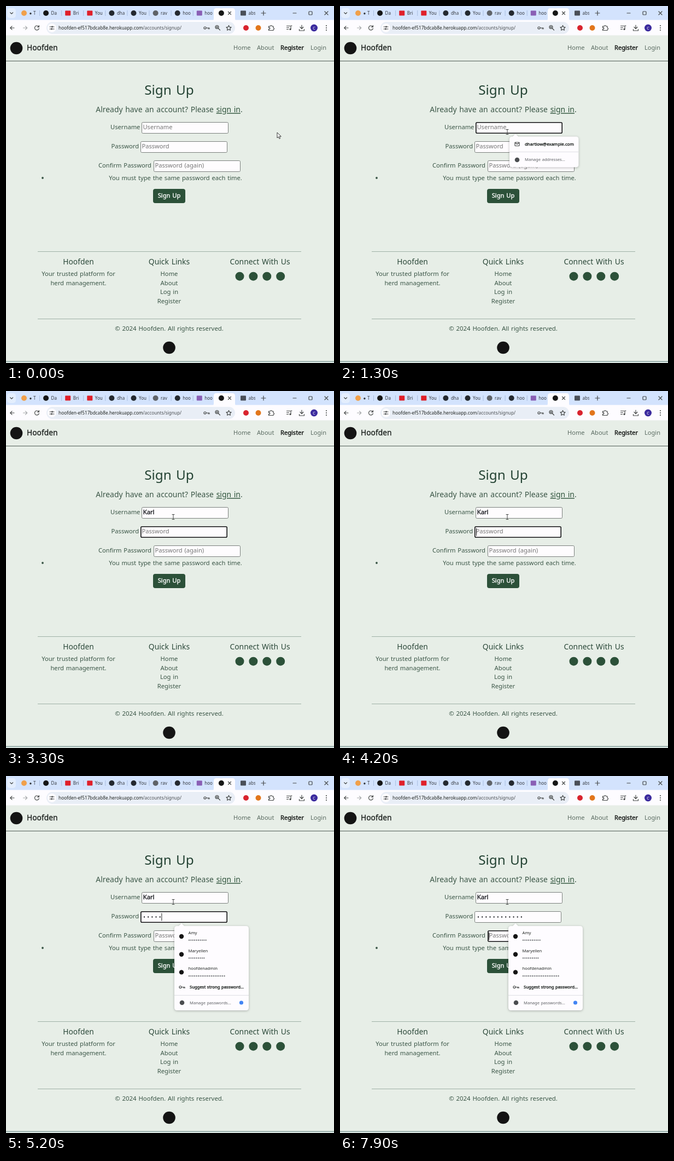
An HTML page for the animation above (8000 ms loop, 600 by 652 pixels).

```html
<!DOCTYPE html>
<html lang="en">
<head>
<meta charset="utf-8">
<title>Sign Up</title>
<style>
html, body { margin: 0; width: 100%; height: 100%; overflow: hidden; background: #e7eee7; }
svg { display: block; width: 600px; height: 652px; }
text { font-family: "Noto Sans", "Open Sans", sans-serif; word-spacing: .08em; white-space: pre; }
.line { fill: none; stroke: #444746; stroke-width: 1.2; stroke-linecap: round; stroke-linejoin: round; }
.pop { fill: #fefcff; filter: drop-shadow(0 1px 2px #0004); }
</style>
</head>
<body>
<svg id="stage" viewBox="0 0 600 652" xmlns="http://www.w3.org/2000/svg"></svg>
<script>
const GREEN = '#2c5139', INK = '#3a5546', HEAD = '#2b4839', DARK = '#1f2421', GRAY = '#757575';
const text = (x, y, s, size = 11.2, fill = INK, more = '') =>
  `<text x="${x}" y="${y}" font-size="${size}" fill="${fill}" ${more}>${s}</text>`;
const mid = (x, y, s, size, fill, more = '') =>
  text(x, y, s, size, fill, `text-anchor="middle" ${more}`);
// A thin outline gives a medium weight without changing the widths.
const medium = color => `stroke="${color}" stroke-width=".35"`;
const dot = (x, y, r, fill) => `<circle cx="${x}" cy="${y}" r="${r}" fill="${fill}"/>`;
const box = (x, y, w, h, fill, more = '') =>
  `<rect x="${x}" y="${y}" width="${w}" height="${h}" fill="${fill}" ${more}/>`;
const line = (d, more = '') => `<path class="line" d="${d}" ${more}/>`;
const rule = (x1, x2, y, color) => box(x1, y, x2 - x1, 1, color);
const dots = (n, x, y, step, r, fill) =>
  Array.from({ length: n }, (_, i) => dot(x + i * step, y, r, fill)).join('');
const key = (x, y) => line(`M${x - 5} ${y}a2 2 0 1 0 4 0a2 2 0 1 0-4 0M${x - 1} ${y}h6v2M${x + 3} ${y}v2`);

function tabs() {
  const list = [['#f0a04b', '● T'], ['#161616', 'Da'], ['#e0202a', 'Bri', 1], ['#e0202a', 'You', 1],
    ['#24292f', 'dha'], ['#24292f', 'You'], ['#5f6368', 'rav'], ['#24292f', 'hoo'],
    ['#8a5fb5', 'hoo', 1], ['#161616', ''], ['#4a4f58', 'abs', 1]];
  return box(0, 0, 600, 27, '#d3e3fd') + box(2, 4, 16, 18, '#e4eefd', 'rx="5"') +
    line('M7.8 12l2.4 2.4l2.4-2.4') +
    '<path d="M376 27q4 0 4-4V9q0-5 5-5h29q5 0 5 5v14q0 4 4 4z" fill="#fdfcff"/>' +
    list.map(([color, label, square], i) => {
      const x = 33 + i * 40.1;
      return (square ? box(x - 5, 8.5, 10, 9, color, 'rx="1"') : dot(x, 13, 5, color)) +
        text(x + 9.5, 16, label, 8, '#35393f') +
        (i < 8 ? box(x + 28, 8, 1, 10, '#a9bedf') : '');
    }).join('') +
    box(456, 4, 8, 18, '#d3e3fd') +
    line('M406.5 10.5l5 5m0-5l-5 5M467 13h8m-4-4v8M525 13h6M583 10l6 6m0-6l-6 6') +
    box(554, 10, 6, 6, 'none', 'class="line" rx="1"');
}

function toolbar() {
  return box(0, 25.5, 600, 28, '#fdfcff') + box(74, 29, 345, 22, '#e9eef6', 'rx="11"') +
    dot(84, 40, 8, '#fdfcff') +
    line('M15 40H8m3-3.2l-3.2 3.2l3.2 3.2') +
    line('M31.5 40h7m-3-3.2l3.2 3.2l-3.2 3.2', 'style="stroke:#a5a8aa"') +
    line('M60 38a4 4 0 1 0 .4 3M60.4 35.6v2.8h-2.8') +
    line('M80 38h3M86 38h2M80 42h2M85.5 42h2.5') +
    dot(84.5, 38, 1.4, '#444746') + dot(83.5, 42, 1.4, '#444746') +
    text(96, 43, 'hoofden-ef517bdcab8e.herokuapp.com<tspan fill="#4c5054">/accounts/signup/</tspan>', 8.3, DARK) +
    key(367, 40) +
    line('M383 38.5a3 3 0 1 0 6 0a3 3 0 1 0-6 0M388.5 41l3 3M384.6 38.5h2.8M386 37.1v2.8') +
    line('M407.5 35.5l1.4 2.9l3.2.4l-2.3 2.2l.6 3.2l-2.9-1.5l-2.9 1.5l.6-3.2l-2.3-2.2l3.2-.4z') +
    dot(439, 40, 5, '#d9232e') + dot(461.5, 40, 5, '#e2761b') +
    line('M480.5 37h3a1.5 1.5 0 1 1 3 0h2.5v3a1.5 1.5 0 1 1 0 3v1.5h-8.5v-2.5a1.5 1.5 0 1 0 0-2.5z') +
    line('M513.5 36.5h6M513.5 39.5h4M513.5 42.5h3M521 42v-6h2') + dot(520, 42.5, 1.6, '#444746') +
    line('M541 35v6.5m-3-3l3 3l3-3M536.5 42.5v2.5h9v-2.5') +
    dot(563.5, 40, 6.5, '#3b2a9e') + mid(563.5, 42.6, 'C', 7, '#fff') +
    [36, 40, 44].map(y => dot(586, y, 1.1, '#444746')).join('');
}

function page() {
  const nav = [[416, 'Home'], [459, 'About'], [502, 'Register'], [557, 'Login']];
  const links = ['Home', 'About', 'Log in', 'Register'];
  return dot(19, 77, 11.3, '#141414') + text(38, 81.2, 'Hoofden', 13.8, DARK, medium(DARK)) +
    nav.map(([x, s]) => s === 'Register'
      ? text(x, 80.3, s, 11.1, '#0c0f0d', medium('#0c0f0d'))
      : text(x, 80.3, s, 11.1, '#5b6c62')).join('') +
    rule(0, 600, 100, '#525d57') +
    mid(298.5, 161.7, 'Sign Up', 24.3, '#234233') +
    mid(298.5, 194.3, `Already have an account? Please <tspan fill="${GREEN}" text-decoration="underline">sign in</tspan>.`, 13.9) +
    text(191, 225.2, 'Username') + text(192.5, 260.2, 'Password') + text(169, 295.2, 'Confirm Password') +
    dot(67, 314, 1.9, INK) + mid(310, 317.6, 'You must type the same password each time.') +
    box(269, 334, 59, 26, GREEN, 'rx="4"') +
    mid(298.5, 349.8, 'Sign Up', 11.2, '#fff', medium('#fff')) +
    rule(58, 540, 448, '#9fb1a6') +
    mid(132.5, 472.2, 'Hoofden', 13.8, HEAD) + mid(298.5, 472.2, 'Quick Links', 13.9, HEAD) +
    mid(464.5, 472.2, 'Connect With Us', 13.9, HEAD) +
    mid(132.5, 493.2, 'Your trusted platform for') + mid(132.5, 509.8, 'herd management.') +
    links.map((s, i) => mid(298.5, 493.2 + i * 16.6, s)).join('') +
    dots(4, 427.5, 493.7, 24.9, 8, GREEN) +
    rule(58, 540, 571, '#9fb1a6') +
    mid(298.5, 593.2, '© 2024 Hoofden. All rights reserved.', 11.4) +
    dot(298.5, 624, 11.3, '#141414') +
    box(0, 648.5, 600, 1.5, '#86a09c') + box(0, 650, 600, 2, '#dce8e4');
}

const popup = (x, y, w, h, body) =>
  `<path class="pop" d="M316 ${y}l5-5l5 5H${x + w - 5}q5 0 5 5v${h - 10}q0 5-5 5H${x + 5}q-5 0-5-5v${10 - h}q0-5 5-5z"/>` + body;

const popups = {
  mail: popup(310, 238.5, 126.5, 56,
    box(320, 249, 8, 6.5, 'none', 'class="line" rx=".8"') + line('M320.5 249.8l3.5 2.7l3.5-2.7') +
    text(338, 255.3, 'dhartlow@example.com', 7.9, DARK, medium(DARK)) +
    rule(310, 436, 266, '#dfdfe4') + dot(324, 281, 4.3, '#4b4d50') +
    text(338, 283.3, 'Manage addresses...', 7.6, '#5c5f62')),
  name: popup(310, 238.5, 98, 28.5, text(318, 255.3, 'Karl', 7.7, DARK)),
  pass: popup(308, 274, 136, 154,
    [['Amy', 10], ['Maryellen', 9], ['hoofdenadmin', 20]].map(([s, n], i) => {
      const y = 288.8 + i * 32.7;
      return dot(321, y + 4.2, 4.2, '#141414') + text(333.5, y, s, 7.7, DARK) +
        dots(n, 335, y + 11, 3.4, 1, '#3c4043');
    }).join('') +
    key(322, 385.5) + text(336, 388.4, 'Suggest strong password...', 7.7, DARK, medium(DARK)) +
    rule(308, 444, 400, '#dfdfe4') + dot(322, 414, 4.3, '#4b4d50') +
    text(336, 416.8, 'Manage passwords...', 7.6, '#5c5f62') + dot(430.5, 414, 3.6, '#4285f4'))
};

const fields = [[248, 212, 'Username'], [246, 247, 'Password'], [270, 282, 'Password (again)']];
function field([x, y, hint], focused, value) {
  const inset = focused ? .8 : .5, color = focused ? '#101012' : '#7b807d';
  return box(x + inset, y + inset, 159 - 2 * inset, 21 - 2 * inset, '#fefcfe',
    `rx="2" stroke="${color}" stroke-width="${focused ? 1.6 : 1}"`) +
    (value || text(x + 2.5, y + 13.3, hint, 11.1, GRAY));
}
const caret = (x, y) => box(x, y, 1, 14, '#222');

// Each track lists [start time, value]; the latest started value holds.
const tracks = {
  focus: [[0, -1], [1200, 0], [3200, 1], [7900, 2]],
  popup: [[0, ''], [1300, 'mail'], [2500, 'name'], [3200, ''], [4700, 'pass']],
  typed: [[0, ''], [2500, 'Ka'], [2900, 'Kar'], [3000, 'Karl']],
  count: [[0, 0], [4700, 2], [5000, 4], [5200, 5], [6000, 6], [6200, 7], [6500, 8],
    [6900, 9], [7200, 10], [7300, 11], [7600, 12]],
  caret: [[0, 0], [2500, 264], [2900, 269], [3000, 272], [3200, 0], [4200, 249], [4700, 'dots'], [7900, 272]]
};
const at = (name, t) => tracks[name].filter(([start]) => start <= t).pop()[1];

function pointer(t) {
  const u = Math.min(1, Math.floor(t / 100) / 5), k = u * u * (3 - 2 * u);
  const x = 496 - 190 * k, y = 231 - k;
  return x > 407
    ? `<path d="M${x} ${y}v10l2.3-2.1l1.7 3.6l1.7-.8l-1.7-3.5h3.3z" fill="#fff" stroke="#222" stroke-width=".9"/>`
    : line(`M${x - 2} ${y - 4.5}h4M${x} ${y - 4.5}v9M${x - 2} ${y + 4.5}h4`, 'style="stroke-width:1"');
}

function scene(t) {
  const focus = at('focus', t), count = at('count', t), typed = at('typed', t);
  const values = [typed && text(250.8, 225.2, typed, 11.2, '#15171c', medium('#15171c')),
    count && dots(count, 253, 257.5, 7.17, 1.15, '#15171c'), ''];
  const mark = at('caret', t), x = mark === 'dots' ? 248.5 + 7.17 * count : mark;
  return fields.map((f, i) => field(f, i === focus, values[i])).join('') +
    (x ? caret(x, fields[focus][1] + 3.5) : '') +
    (popups[at('popup', t)] || '') + pointer(t);
}

const stage = document.getElementById('stage');
stage.innerHTML = box(0, 0, 600, 652, '#e7eee7') + tabs() + toolbar() + page() + '<g id="live"></g>';
const live = document.getElementById('live');
let shown = '';
function frame() {
  const next = scene(performance.now() % 8000);
  if (next !== shown) live.innerHTML = shown = next;
  requestAnimationFrame(frame);
}
frame();
</script>
</body>
</html>
```
